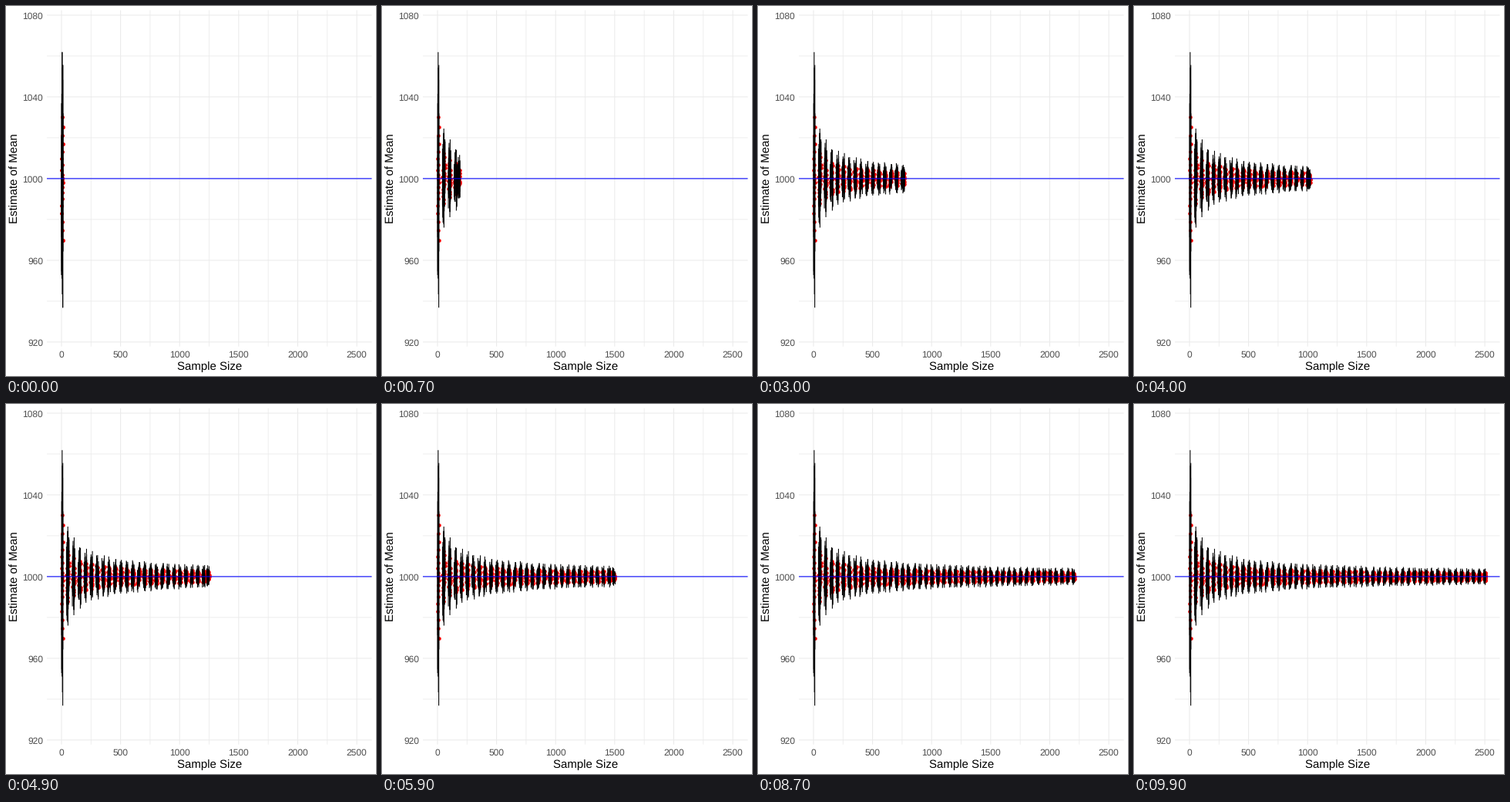
A matplotlib script that plays this animation: 480x480 px, repeating every 10000 ms.

```python
import numpy as np
import matplotlib.pyplot as plt
from matplotlib.animation import FuncAnimation
from matplotlib.collections import LineCollection

SIZE, DPI = 480, 72          # at 72 dpi one point is one pixel
FRAMES, INTERVAL = 100, 100
GROUPS, TRIALS = 51, 20
FIRST, STEP = 10, 50
MEAN, SD = 1000, 50
LEFT, RIGHT, TOP, BOTTOM = 53, 474.5, 5.5, 441.7

plt.rcParams["font.family"] = "Liberation Sans"
plt.rcParams["text.hinting"] = "none"


def px(n):
    return 72 + 0.15324 * np.asarray(n)


def py(v):
    return 223.9 - 2.65 * (np.asarray(v) - MEAN)


def simulate():
    """Sample sizes, means and interval half-widths, one row per group."""
    rng = np.random.default_rng(12)
    size = FRST = FIRST + STEP * np.arange(GROUPS)[:, None]
    se = SD / np.sqrt(size)
    shape = (GROUPS, TRIALS)

    # Neighbouring sizes share a group; the smallest group is narrower.
    x = size + np.linspace(-18, 4, TRIALS) * np.minimum(1, size / 20)

    # Bell-like spread in shuffled order.
    u = np.linspace(-1, 1, TRIALS)
    z = 1.9 * u * np.sqrt(np.abs(u))
    mean = MEAN + se * rng.permuted(np.tile(z, (GROUPS, 1)), axis=1)
    half = 1.96 * se * rng.uniform(0.88, 1.1, shape)
    return np.minimum(x, 2503), mean, half


DATA = np.stack(simulate())

fig = plt.figure(figsize=(SIZE / DPI, SIZE / DPI), dpi=DPI, facecolor="white")
ax = fig.add_axes([0, 0, 1, 1])
ax.set_xlim(0, SIZE)
ax.set_ylim(SIZE, 0)
ax.axis("off")


def rule(xs, ys, color, width, z):
    ax.plot(xs, ys, color=color, lw=width, zorder=z, snap=False,
            solid_capstyle="butt")


def grid_x(n, width):
    rule([px(n)] * 2, [TOP, BOTTOM], "#ebebeb", width, 1)


def grid_y(v, width):
    rule([LEFT, RIGHT], [py(v)] * 2, "#ebebeb", width, 1)


for n in range(250, 2500, 500):
    grid_x(n, 0.8)
for v in range(940, 1080, 40):
    grid_y(v, 0.8)
for n in range(0, 2501, 500):
    grid_x(n, 1.07)
    ax.text(px(n), 456.2, str(n), size=12, color="#4d4d4d", ha="center")
for v in range(920, 1081, 40):
    grid_y(v, 1.07)
    ax.text(48.2, py(v) + 4.9, str(v), size=12, color="#4d4d4d", ha="right")

ax.text(264, 472, "Sample Size", size=15, ha="center")
ax.text(19, 224, "Estimate of Mean", size=15, rotation=90,
        ha="right", va="center")

dots = ax.scatter([], [], s=4.6 ** 2, color="red", linewidths=0, zorder=2)
bars = LineCollection([], colors="black", linewidths=1.07, zorder=3)
dots.set_snap(False)
bars.set_snap(False)
ax.add_collection(bars, autolim=False)
rule([LEFT, RIGHT], [py(MEAN)] * 2, "blue", 1.07, 4)


def update(frame):
    # Finished groups stay; the newest one glides towards the next.
    pos = frame * (GROUPS - 1) / (FRAMES - 1)
    k = int(pos + 1e-9)
    t = pos - k
    nxt = min(k + 1, GROUPS - 1)
    moving = (1 - t) * DATA[:, k] + t * DATA[:, nxt]
    done = DATA[:, :k + 1].reshape(3, -1)
    x, mean, half = np.hstack([done, moving])

    cx = px(x)
    dots.set_offsets(np.column_stack([cx, py(mean)]))
    ends = [np.column_stack([cx, py(mean + s * half)]) for s in (-1, 1)]
    bars.set_segments(np.stack(ends, axis=1))
    return dots, bars


anim = FuncAnimation(fig, update, frames=FRAMES, interval=INTERVAL,
                     repeat=True, repeat_delay=0, blit=False)
plt.show()
```
